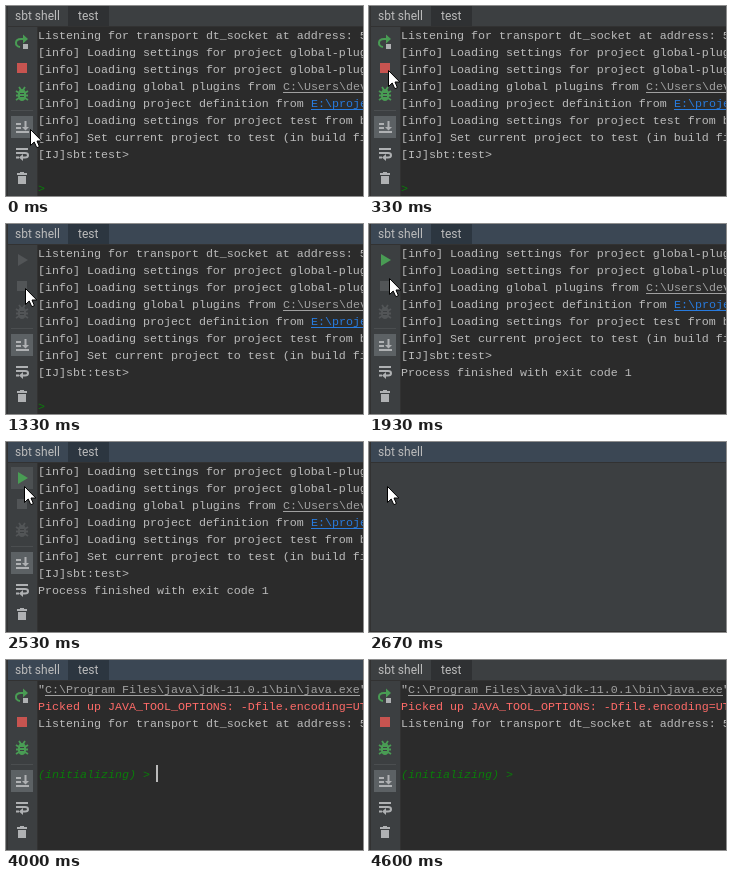
An HTML page with a canvas for the animation above (4.67 s loop, 357 px wide and 190 px high).

```html
<!DOCTYPE html>
<html lang="en">
<head>
<meta charset="utf-8">
<title>sbt shell restart</title>
<style>
  html, body { margin: 0; width: 100%; height: 100%; overflow: hidden; background: #3c3f41; }
  canvas { display: block; }
</style>
</head>
<body>
<canvas id="stage" width="357" height="190"></canvas>
<script>
const ctx = document.getElementById('stage').getContext('2d');
const LOOP = 4670, W = 357, H = 190;
const MONO = '11.67px "Liberation Mono", monospace';
const UI = '12px Roboto, sans-serif';
const TIP = '12px "Open Sans", sans-serif';
const LEFT = 32, TOP = 20, LINE = 17, CHAR = 7;

const C = {
  panel: '#3c3f41', active: '#3b4754', console: '#2b2b2b', border: '#323232',
  tab: '#2f3133', activeTab: '#2c3640', text: '#bbbbbb', link: '#a0a0a0', blue: '#287bde',
  error: '#ff6b68', prompt: '#0a7d0a', green: '#499c54', red: '#c75450',
  icon: '#afb1b3', dim: '#525557', hover: '#4c5052', pressed: '#5c6164'
};

// Log lines are lists of [text, colour, underlined] runs.
const plain = s => [[s, C.text]];
const listening = plain('Listening for transport dt_socket at address: 5005');
const settings = plain('[info] Loading settings for project global-plugins');
const sessionLog = [
  listening, settings, settings,
  [['[info] Loading global plugins from ', C.text], ['C:\\Users\\dev\\.sbt', C.link, true]],
  [['[info] Loading project definition from ', C.text], ['E:\\project\\test', C.blue, true]],
  plain('[info] Loading settings for project test from build'),
  plain('[info] Set current project to test (in build file)'),
  plain('[IJ]sbt:test>')
];
const finishedLog = [...sessionLog.slice(1), plain('Process finished with exit code 1')];
const startLog = [
  [['"', C.text], ['C:\\Program Files\\java\\jdk-11.0.1\\bin\\java.exe', C.link, true], ['"', C.text]],
  [['Picked up JAVA_TOOL_OPTIONS: -Dfile.encoding=UTF-8', C.error]],
  listening
];

// Stepped tracks: [time, ...values]; the latest entry holds.
const pointer = [
  [0, 24, 123], [70, 19, 112], [130, 13, 96], [200, 10, 81], [270, 14, 70], [330, 19, 64],
  [1800, 20, 62], [1870, 20, 58], [1930, 20, 54], [2000, 19, 49], [2070, 18, 46],
  [2200, 18, 45], [2270, 18, 44], [3200, -50, 0]
];
const tooltip = [[0, 0], [670, .4], [730, .9], [800, .7], [870, .35], [930, 0]];
const at = (track, t) => track.findLast(step => step[0] <= t).slice(1);
const within = (t, from, to) => t >= from && t < to;

const arrow = new Path2D('M.5.5V16.5L4.2 13L6.8 18.7L9.4 17.6L7 12H11.8Z');

function rect(x, y, w, h, color) {
  ctx.fillStyle = color;
  ctx.fillRect(x, y, w, h);
}

function label(s, x, y, color, font) {
  ctx.font = font;
  ctx.fillStyle = color;
  ctx.fillText(s, x, y);
}

// Draws an icon around the toolbar's centre line.
function icon(y, color, fill, stroke, width = 1.5) {
  ctx.save();
  ctx.translate(16, y);
  ctx.fillStyle = ctx.strokeStyle = color;
  ctx.lineWidth = width;
  if (fill) ctx.fill(new Path2D(fill));
  if (stroke) ctx.stroke(new Path2D(stroke));
  ctx.restore();
}

function toolbar(t) {
  const stopped = within(t, 1330, 2670);
  if (within(t, 670, 930)) rect(5, 51, 22, 22, t < 800 ? C.hover : C.pressed);
  if (within(t, 2530, 2670)) rect(5, 25, 22, 22, C.hover);
  if (stopped) {
    icon(36, t < 1670 ? C.dim : C.green, 'M-4-6L6 0L-4 6Z');
  } else {
    icon(36, C.green, 'M1-7.5L6-3L1 1.5Z', 'M-2 5C-7.5 4-7.5-3-1-3H2', 2);
    icon(36, C.icon, 'M1 2H6V7H1Z');
  }
  icon(62, stopped ? C.dim : C.red, 'M-5-5H5V5H-5Z');
  icon(88, stopped ? C.dim : C.green,
    'M-3-3Q-3-5 0-5Q3-5 3-3L4-2V3Q3 7 0 7Q-3 7-4 3V-2Z',
    'M-3-7L-1-4M3-7L1-4M-6-3L-3-1M6-3L3-1M-6 1.5H6M-6 6L-3 4M6 6L3 4', 1.8);
  icon(88, C.panel, 'M-2-1H2V0H-2ZM-2 2H2V3H-2Z');
  rect(5, 104, 22, 1, '#4b4e50');
  rect(5, 110, 22, 22, C.pressed);
  icon(121, C.icon, 'M0 0H7L3.5 3.5Z', 'M-6-3H-1M-6 1H-1M-6 5H7M3.5-6V1', 2);
  icon(147, C.icon, 'M1 1V8L-3 4.5Z', 'M-6-4H6M-6 0H3C7 0 7 4.5 3 4.5H0M-6 4.5H-3', 2);
  icon(172, C.icon, 'M-5-5H-2V-6H2V-5H5V-3H-5ZM-4-2H4V6H-4Z');
}

function logLine(runs, row) {
  const base = TOP + row * LINE + 13;
  let x = LEFT;
  for (const [s, color, underlined] of runs) {
    label(s, x, base, color, MONO);
    if (underlined) rect(x, base + 2, s.length * CHAR, 1, color);
    x += s.length * CHAR;
  }
}

function prompt(s, row, style, caret) {
  label(s, LEFT, TOP + row * LINE + 13, C.prompt, style + MONO);
  if (caret) rect(LEFT + (s.length + 1) * CHAR - 1, TOP + row * LINE, 2, LINE, C.text);
}

function consoleText(t) {
  if (t < 1670) {
    sessionLog.forEach(logLine);
    prompt('>', 9, '', within(t, 800, 1270));
  } else if (t < 2670) {
    finishedLog.forEach(logLine);
  } else {
    const count = t < 3130 ? 1 : t < 3530 ? 2 : 3;
    startLog.slice(0, count).forEach(logLine);
    prompt('(initializing) >', count + 2, 'italic ', t < 3530 || within(t, 4000, 4530));
  }
}

function draw(t) {
  const focused = within(t, 800, 4600);
  const closed = within(t, 2670, 3000);
  rect(0, 0, W, H, C.panel);
  rect(2, 0, W - 2, 20, focused ? C.active : C.panel);
  if (!closed) {
    rect(62, 0, 41, 20, focused ? C.activeTab : C.tab);
    label('test', 72, 14, C.text, UI);
    rect(31, 20, 1, H - 20, C.border);
    rect(32, 20, W - 32, H - 20, C.console);
    toolbar(t);
    consoleText(t);
  } else {
    rect(2, H - 1, W - 2, 1, C.border);
  }
  label('sbt shell', 9, 14, C.text, UI);
  rect(2, 20, W - 2, 1, C.border);
  rect(1, 0, 1, H, C.border);

  ctx.globalAlpha = at(tooltip, t)[0];
  rect(0, 19, 144, 29, '#55585a');
  rect(0, 20, 143, 27, '#46494b');
  label('Stop sbt shell (Ctrl+F2)', 8, 39, C.text, TIP);
  ctx.globalAlpha = 1;

  ctx.save();
  ctx.translate(...at(pointer, t));
  ctx.fillStyle = '#fff';
  ctx.strokeStyle = '#000';
  ctx.lineWidth = 1;
  ctx.fill(arrow);
  ctx.stroke(arrow);
  ctx.restore();
}

function tick() {
  draw(performance.now() % LOOP);
  requestAnimationFrame(tick);
}
tick();
</script>
</body>
</html>
```
